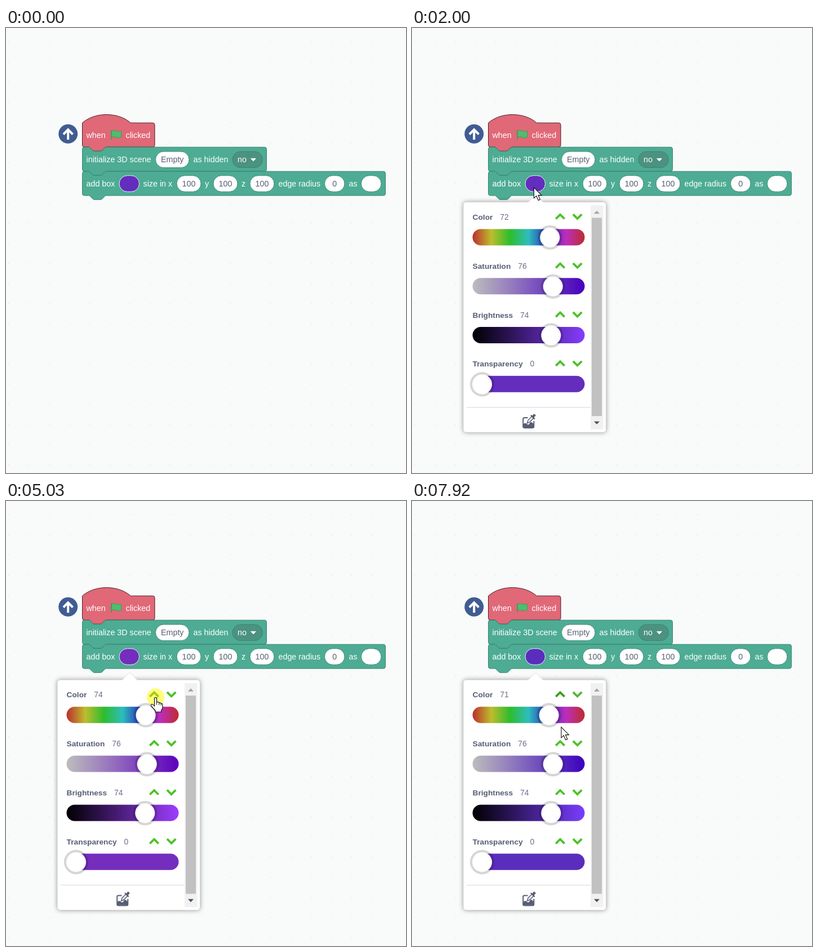
Recreate the animation shown at these times as an HTML page with a canvas. Size 710x789 px, loop 7.99 s.

```html
<!DOCTYPE html>
<html lang="en">
<head>
<meta charset="utf-8">
<title>Block colour picker</title>
<style>
  html, body { margin: 0; width: 100%; height: 100%; overflow: hidden; background: #f9fafa; }
  canvas { display: block; }
</style>
</head>
<body>
<canvas id="stage" width="710" height="789"></canvas>
<script>
const ctx = document.getElementById('stage').getContext('2d');
const LOOP = 7990, SCALE = 0.8935, LEFT = 135.5, INK = '#575e75';
const FONT = '"Liberation Sans", Arial, sans-serif';

// Each press: [start, end, change of hue on release]
const PRESSES = [
  [1460, 1730, 0], [3900, 3970, 1], [4500, 4570, 1], [5030, 5100, 1],
  [5850, 5980, -1], [6440, 6510, -1], [6650, 6780, -1], [7370, 7440, -1]
];
// Pointer moves: [start, end, x0, y0, x1, y1]
const MOVES = [
  [460, 1250, 654, 775, 231, 296], [1250, 1390, 231, 296, 216, 282],
  [2340, 2830, 216, 282, 260, 335], [3090, 3370, 260, 335, 265.5, 348.5],
  [5230, 5650, 265.5, 348.5, 290.7, 344], [7570, 7920, 290.7, 344, 264.5, 400]
];

const clamp = v => Math.max(0, Math.min(1, v));
const smooth = p => p * p * (3 - 2 * p);

function hsv(h, s, v) {
  const channel = n => {
    const k = (n + h * 0.06) % 6;
    return Math.round(255 * v * (1 - s * clamp(Math.min(k, 4 - k))));
  };
  return `rgb(${channel(5)},${channel(3)},${channel(1)})`;
}

function paint(path, fill, stroke, width = 1) {
  if (fill) { ctx.fillStyle = fill; ctx.fill(path); }
  if (stroke) { ctx.strokeStyle = stroke; ctx.lineWidth = width; ctx.stroke(path); }
}

function box(x, y, w, h, r, fill, stroke, width) {
  const path = new Path2D();
  path.roundRect(x, y, w, h, r);
  paint(path, fill, stroke, width);
}

function disc(x, y, r, fill) {
  const path = new Path2D();
  path.arc(x, y, r, 0, 7);
  paint(path, fill);
}

function shape(d, x, y, fill, stroke, width) {
  ctx.save();
  ctx.translate(x, y);
  paint(new Path2D(d), fill, stroke, width);
  ctx.restore();
}

function text(str, x, y, color = '#fff', font = '14.3px', align = 'left') {
  ctx.font = `${font} ${FONT}`;
  ctx.textAlign = align;
  ctx.fillStyle = color;
  ctx.fillText(str, x, y);
  return ctx.measureText(str).width;
}

function block(top, width, fill, stroke, hat) {
  const w = width / SCALE, h = 48;
  const notch = 'c2 0 3 1 4 2l4 4c1 1 2 2 4 2h12c2 0 3 -1 4 -2l4 -4c1 -1 2 -2 4 -2';
  const notchBack = 'c-2 0 -3 1 -4 2l-4 4c-1 1 -2 2 -4 2h-12c-2 0 -3 -1 -4 -2l-4 -4c-1 -1 -2 -2 -4 -2';
  const start = hat ? 'M0 0c25 -22 71 -22 96 0' : 'M0 4a4 4 0 0 1 4 -4H12' + notch;
  const d = `${start}H${w - 4}a4 4 0 0 1 4 4V${h - 4}a4 4 0 0 1 -4 4H48${notchBack}H4a4 4 0 0 1 -4 -4z`;
  ctx.save();
  ctx.translate(LEFT, top);
  ctx.scale(SCALE, SCALE);
  paint(new Path2D(d), fill, stroke, 1 / SCALE);
  ctx.restore();
}

function field(x, w, cy, value = '', fill = '#fff', stroke = '#3f8e79') {
  box(x, cy - 14.3, w, 28.6, 14.3, fill, stroke);
  if (value) text(value, x + w / 2, cy + 5, INK, '14.3px', 'center');
}

function workspace(color) {
  ctx.fillStyle = '#f9fafa';
  ctx.fillRect(0, 0, 710, 789);
  ctx.fillStyle = '#e1e4e6';
  for (let x = 5.3; x < 710; x += 35.77)
    for (let y = 23.9; y < 789; y += 35.72) ctx.fillRect(Math.round(x) - 1, Math.round(y), 2, 1);

  disc(110.2, 187.8, 17, '#405c93');
  shape('M-8.3 .7L0 -7.6L8.3 .7M0 -6.5V10.3', 110.2, 187.8, null, '#fff', 4);

  block(168.2, 128.5, '#e06877', '#481c28', true);
  text('when', 142.5, 195);
  shape('M0 2C5 -2 9 5 17.5 1.5V12.5C9 16 5 9 0 13z', 187, 181, '#4cbf6e', '#43995a');
  shape('M0 0V17', 187.2, 181, null, '#43995a', 1.6);
  text('clicked', 212.5, 195);

  block(211.2, 327, '#4dac93', '#36846f');
  text('initialize 3D scene', 142.5, 238.3);
  field(265.5, 59.5, 233.3, 'Empty');
  text('as hidden', 332.5, 238.3);
  field(402, 53.5, 233.3, '', '#4c9280', '#3f8270');
  text('no', 411, 238.3);
  shape('M-4.3 -2.2H4.3L0 2.4z', 439, 233.6, '#fff', '#fff', 1);

  block(254.2, 538, '#4dac93', '#36846f');
  text('add box', 142.5, 281);
  field(201, 35.5, 276, '', color, '#f1eef8');
  text('size in x', 243.5, 281);
  text('y', 353, 281);
  text('z', 418, 281);
  for (const x of [303, 368, 433]) field(x, 43, 276, '100');
  text('edge radius', 483.5, 281);
  field(565.5, 35.5, 276, '0');
  text('as', 608.5, 281);
  field(630.5, 35.5, 276);
}

function slider(y, stops, value, from = 107.5) {
  const gradient = ctx.createLinearGradient(107.5, 0, 306.5, 0);
  stops.forEach((c, i) => gradient.addColorStop(i / (stops.length - 1), c));
  box(from, y - 14.5, 306.5 - from, 29, 14.5, gradient);
  const x = 124.5 + 1.65 * value;
  disc(x, y + 0.5, 21.7, 'rgba(0,0,0,.16)');
  disc(x, y + 0.5, 17.5, '#fff');
}

function popup(t, hue) {
  const S = 0.762, V = 0.741, color = hsv(hue, S, V);
  ctx.save();
  ctx.globalAlpha = clamp((t - 1900) / 100);
  ctx.translate(0, -21 * (1 - clamp((t - 1880) / 330)) ** 2);

  ctx.save();
  ctx.shadowColor = 'rgba(0,0,0,.4)';
  ctx.shadowBlur = 9;
  box(91, 317, 253.5, 408.5, 5, '#fff');
  ctx.restore();
  box(91, 317, 253.5, 408.5, 5, '#fff', '#cfcfcf');
  shape('M-14 13.5L-2.2 1.3Q0 -.8 2.2 1.3L14 13.5z', 219.5, 304.5, '#fff');
  shape('M-13 12.5L-2.2 1.3Q0 -.8 2.2 1.3L13 12.5', 219.5, 304.5, null, '#d6d6d6', 0.8);

  ctx.fillStyle = '#f1f1f1';
  ctx.fillRect(317, 323, 22.5, 397);
  ctx.fillStyle = '#c1c1c1';
  ctx.fillRect(319, 345, 18, 351.5);
  shape('M-5 2.7L0 -2.7L5 2.7z', 328, 335, '#a3a3a3');
  shape('M-5 -2.7L0 2.7L5 -2.7z', 328, 708.5, '#4c5268');

  const ramp = make => [0, 1, 2, 3, 4, 5, 6].map(i => make(i / 6));
  const rows = [
    ['Color', hue, ramp(p => hsv(p * 100, S, V))],
    ['Saturation', 76.2, ramp(p => hsv(hue, p, V))],
    ['Brightness', 74.1, ramp(p => hsv(hue, S, p))],
    ['Transparency', 0, [color, color], 118]
  ];
  rows.forEach(([label, value, stops, from], i) => {
    const dy = 86.8 * i;
    const width = text(label, 107.6, 348.4 + dy, INK, 'bold 13.7px');
    text(Math.floor(value), 107.6 + width + 13, 348.4 + dy, '#6b7086', '13.9px');
    const up = i === 0 && t >= 3230 ? '#3d9c20' : '#4cc226';
    const down = i === 0 && t >= 5510 ? '#55b438' : '#4cc226';
    shape('M-7.7 4.2L0 -3.4L7.7 4.2', 263, 342.7 + dy, null, up, 3.8);
    shape('M-7.7 -4.2L0 3.4L7.7 -4.2', 293.6, 343 + dy, null, down, 3.8);
    slider(379.3 + dy, stops, value, from);
  });

  ctx.fillStyle = '#dcdde2';
  ctx.fillRect(97, 680.5, 220, 1.2);
  shape('M9.5 9H3.5Q1.2 9 1.2 11.3V24.5Q1.2 26.8 3.5 26.8H18Q20.3 26.8 20.3 24.5V15', 196, 690.5, null, INK, 2);
  shape('M2 20Q5 17 8 20T13 18.5T20 20V26H2z', 196, 690.5, INK);
  shape('M8.5 18.5L10 13.5L17 6.5L20 9.5L13 16.5z', 196, 690.5, '#fff', INK, 1.5);
  shape('M15 4.5L21.7 11.2', 196, 690.5, null, INK, 2.4);
  shape('M18.5 7.5L22.3 3.3', 196, 690.5, null, INK, 4.4);
  ctx.restore();
}

function pointer(t) {
  if (t < MOVES[0][0]) return;
  const [start, end, x0, y0, x1, y1] = MOVES.filter(m => t >= m[0]).pop();
  const p = smooth(clamp(Math.floor((t - start) / 70 + 0.01) * 70 / (end - start) + (t >= end)));
  const x = x0 + (x1 - x0) * p, y = y0 + (y1 - y0) * p;

  const pressed = PRESSES.some(([on, off]) => t >= on && t < off);
  const fading = t >= 1730 && t < 1800;
  if (pressed || fading) disc(x, y - 0.5, 15.7, `rgba(255,250,0,${pressed ? 0.52 : 0.25})`);

  if (t >= 3230 && t < 7710) {
    shape('M-2 1.7Q-2 -.2 0 -.2Q2 -.2 2 1.7V8.2Q5.5 7.3 6.2 9.2Q9 8.6 9.6 10.6Q12.4 10.2 12.4 13V17.5Q12 21 10 22.5V25.5H-.5V23Q-4 19.5 -8 14.3Q-8.7 12.6 -7 11.8Q-5.3 11.4 -2 15z',
      x, y, '#fff', '#111', 1.2);
    shape('M2 8V13M6.2 9.5V13.3M9.6 11V14', x, y, null, '#111', 1);
  } else {
    shape('M.4 .8V19.8L4.7 15.8L8.2 23.6L11.4 22.2L8 14.6H13.9z', x, y, '#fff', '#111', 1.1);
  }
}

function frame(now) {
  const t = now % LOOP;
  const hue = PRESSES.reduce((h, [, off, step]) => t >= off ? h + step : h, 72.9);
  workspace(hsv(hue, 0.762, 0.741));
  if (t >= 1930) popup(t, hue);
  pointer(t);
  requestAnimationFrame(frame);
}
requestAnimationFrame(frame);
</script>
</body>
</html>
```
